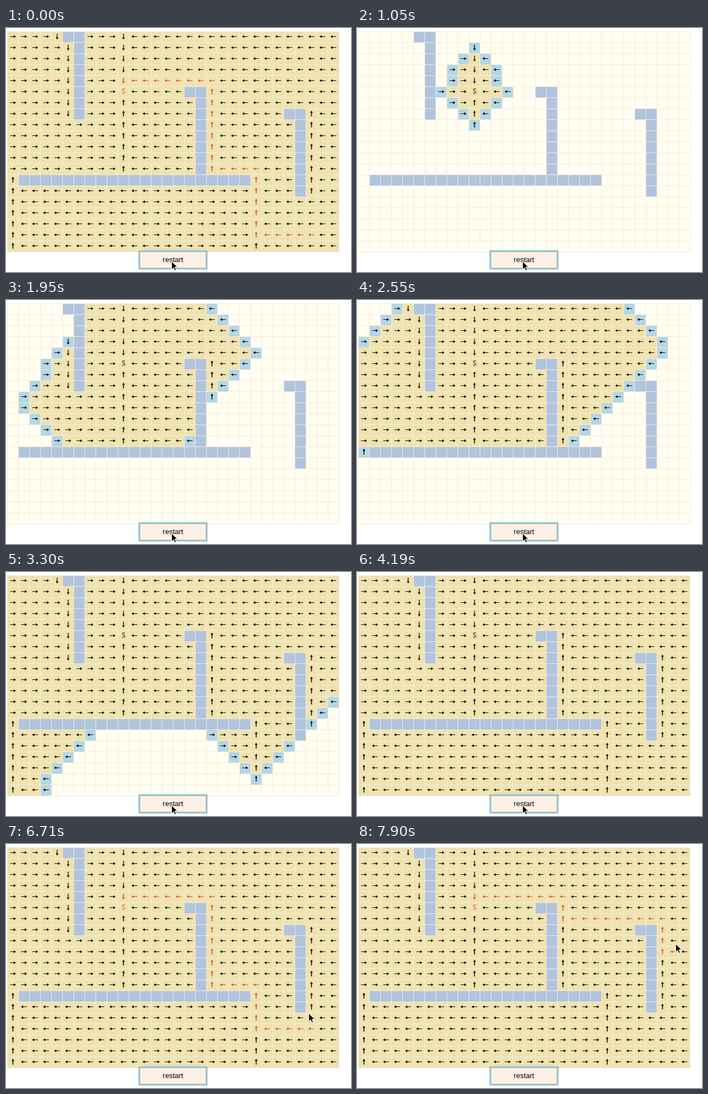
Write an HTML page with a canvas that moves like this. It is 624 px wide and 443 px high and loops after 8 s.

```html
<!DOCTYPE html>
<html lang="en">
<head>
<meta charset="utf-8">
<title>Path search</title>
<style>
  html, body { margin: 0; width: 100%; height: 100%; overflow: hidden; background: #fff; }
  #stage { position: relative; width: 624px; height: 443px; overflow: hidden; }
  canvas, svg { position: absolute; left: 0; top: 0; }
  svg { overflow: visible; }
  .button {
    position: absolute; left: 242px; top: 406px; width: 118px; height: 28px;
    border: 1px solid #e3d157; background: #faf0e6;
    box-shadow: 0 0 0 2px #82bcf5, 0 0 2px 2px #82bcf5;
    font: 13px/28px "Liberation Sans", Arial, sans-serif; text-align: center; color: #000;
  }
</style>
</head>
<body>
<div id="stage">
  <canvas id="grid" width="624" height="443"></canvas>
  <div class="button">restart</div>
  <svg width="1" height="1">
    <g id="pointer">
      <path id="arrow" d="M.5 .5V15.2L3.9 12 6.3 17.3 8.7 16.3 6.4 11H11Z" fill="#000" stroke="#fff"/>
      <path id="beam" d="M-3-7.5Q0-7.5 0-5Q0-7.5 3-7.5M0-5V5M-3 7.5Q0 7.5 0 5Q0 7.5 3 7.5M-2 2.5H2" fill="none" stroke="#111" stroke-width="1.2"/>
    </g>
  </svg>
</div>
<script>
const LOOP = 8000, STEP = 148.5, SEARCH_START = 1050, CLICK = 450;
const COLS = 30, ROWS = 20, SIZE = 20;
const COLORS = {
  line: '#fbe8dc', empty: '#fffef0', wall: '#b0c4de', done: '#eee3ae',
  edge: '#b3d7e5', path: '#e8452c', down: '#3a0a08', mark: '#000'
};
const $ = id => document.getElementById(id);
const ctx = $('grid').getContext('2d');
const key = (c, r) => c + ',' + r;

// Three hooks, each eight cells tall with a spur to the left, and one long bar
const walls = new Set();
for (const [c, r] of [[6, 0], [17, 5], [26, 7]]) {
  walls.add(key(c - 1, r));
  for (let i = 0; i < 8; i++) walls.add(key(c, r + i));
}
for (let c = 1; c <= 21; c++) walls.add(key(c, 13));

// Breadth-first search; each node points back to its parent
const start = { c: 10, r: 5, found: 0 };
const nodes = [start];
const byCell = new Map([[key(start.c, start.r), start]]);
for (let i = 0; i < nodes.length; i++) {
  const parent = nodes[i];
  for (const [dc, dr] of [[0, -1], [0, 1], [-1, 0], [1, 0]]) {
    const c = parent.c + dc, r = parent.r + dr, k = key(c, r);
    if (c < 0 || r < 0 || c >= COLS || r >= ROWS || walls.has(k) || byCell.has(k)) continue;
    const node = { c, r, parent, found: i + 1, vertical: dr !== 0, angle: Math.atan2(-dr, -dc) };
    byCell.set(k, node);
    nodes.push(node);
  }
}

// The search slows down slightly as it runs
function expandedAt(t) {
  if (t < SEARCH_START) return nodes.length;
  const k = Math.floor((t - SEARCH_START) / STEP);
  return Math.min(nodes.length, Math.round(16 + 26.89 * k - .037 * k * k));
}

// Pointer legs: start time, number of steps, end point
const legs = [
  { at: 4490, steps: 8, to: [432, 362] },
  { at: 5680, steps: 4, to: [527, 349] },
  { at: 6410, steps: 8, to: [554, 217] },
  { at: 7600, steps: 3, to: [576, 181] }
];
legs.forEach((leg, i) => leg.from = i ? legs[i - 1].to : [299, 423]);

function along(leg, p) {
  const [x0, y0] = leg.from, [x1, y1] = leg.to;
  const easeOut = 1 - (1 - p) ** 3, smooth = p * p * (3 - 2 * p);
  return [x0 + (x1 - x0) * easeOut, y0 + (y1 - y0) * smooth].map(Math.round);
}

// Current position, and the one an update earlier that the route follows
function pointerAt(t) {
  const leg = legs.findLast(l => t >= l.at);
  if (!leg) return { now: legs[0].from, before: legs[0].from, beam: false };
  const k = Math.min(leg.steps, Math.floor((t - leg.at) / STEP) + 1);
  return {
    now: along(leg, k / leg.steps),
    before: along(leg, (k - 1) / leg.steps),
    beam: leg === legs[0] && k === leg.steps
  };
}

function routeFrom(node) {
  const route = new Set();
  for (; node; node = node.parent) route.add(node);
  return route;
}

const cellUnder = ([x, y]) => byCell.get(key(Math.floor((x - 2.5) / SIZE), Math.floor((y - 6.5) / SIZE)));

function fillCell(c, r, color) {
  ctx.fillStyle = color;
  ctx.fillRect(3 + c * SIZE, 7 + r * SIZE, SIZE - 1, SIZE - 1);
}

function drawMark(node, color) {
  ctx.fillStyle = color;
  ctx.save();
  ctx.translate(12.5 + node.c * SIZE, 15.5 + node.r * SIZE);
  if (node === start) {
    ctx.font = '12px "Noto Sans Mono", monospace';
    ctx.textAlign = 'center';
    ctx.fillText('S', 0, 3.5);
  } else {
    const width = node.vertical ? 1.5 : 1;
    ctx.rotate(node.angle);
    ctx.fillRect(-5, -width / 2, 8, width);
    ctx.beginPath();
    ctx.moveTo(1.5, -2.4);
    ctx.lineTo(5.5, 0);
    ctx.lineTo(1.5, 2.4);
    ctx.fill();
  }
  ctx.restore();
}

function drawGrid(expanded, route) {
  ctx.clearRect(0, 0, 624, 443);
  ctx.fillStyle = COLORS.line;
  ctx.fillRect(2, 6, COLS * SIZE + 1, ROWS * SIZE + 1);
  for (let c = 0; c < COLS; c++)
    for (let r = 0; r < ROWS; r++)
      fillCell(c, r, walls.has(key(c, r)) ? COLORS.wall : COLORS.empty);
  nodes.forEach((node, i) => {
    if (node.found > expanded) return;
    const done = i < expanded, down = node.vertical && node.angle > 0;
    fillCell(node.c, node.r, done ? COLORS.done : COLORS.edge);
    drawMark(node, route.has(node) ? COLORS.path : done && down ? COLORS.down : COLORS.mark);
  });
}

function drawPointer({ now, beam }) {
  $('pointer').setAttribute('transform', `translate(${now})`);
  $('arrow').style.display = beam ? 'none' : '';
  $('beam').style.display = beam ? '' : 'none';
}

let shown = '';
function frame() {
  const t = performance.now() % LOOP;
  const expanded = expandedAt(t), pointer = pointerAt(t);
  const state = [t < CLICK, expanded, pointer.now].join();
  if (state !== shown) {
    shown = state;
    const end = t < CLICK ? byCell.get(key(27, 18)) : cellUnder(pointer.before);
    drawGrid(expanded, routeFrom(end));
    drawPointer(pointer);
  }
  requestAnimationFrame(frame);
}
frame();
</script>
</body>
</html>
```
